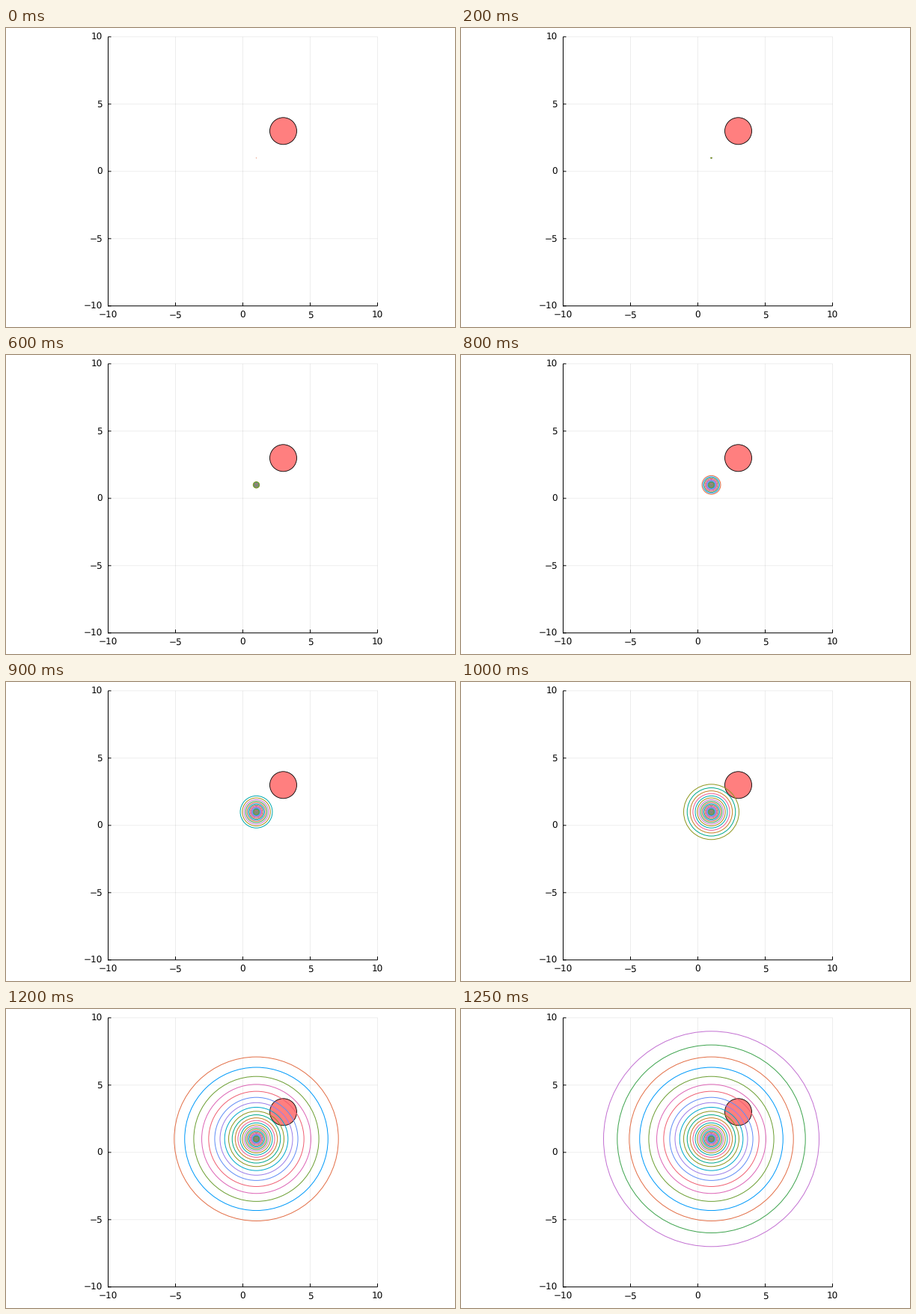
A matplotlib script for the animation above (1.3 s loop, 600 by 400 pixels).

```python
import matplotlib.pyplot as plt
import numpy as np
from matplotlib.animation import FuncAnimation
from matplotlib.patches import Circle

W, H = 600, 400
FRAMES, INTERVAL = 26, 50
UNIT = 18                      # pixels per data unit
LEFT, BOTTOM = 136.5, 371.8    # pixel position of (-10, -10)
TICKS = range(-10, 11, 5)
RINGS = 2 * FRAMES - 1
PALETTE = ["#009AFA", "#E36F47", "#3EA44E", "#C371D2",
           "#AC8E18", "#00AAAE", "#ED5E93", "#C68225",
           "#00A98D", "#8E971E", "#00A9CC", "#9B7FE9",
           "#618DF6", "#F06073", "#DD65B6", "#6C9F33"]

plt.rcParams.update({"font.family": "DejaVu Sans", "font.size": 12,
                     "text.hinting": "none", "path.snap": False})


def px(x):
    return LEFT + (x + 10) * UNIT


def py(y):
    return BOTTOM - (y + 10) * UNIT


fig = plt.figure(figsize=(W / 72, H / 72), dpi=72, facecolor="white")
ax = fig.add_axes([0, 0, 1, 1])
ax.set(xlim=(0, W), ylim=(H, 0))
ax.axis("off")


def line(x, y, **style):
    ax.plot(x, y, lw=1, solid_capstyle="butt", **style)


def draw_axes():
    right, top = px(10), py(10)
    grid = dict(color="black", alpha=0.07, zorder=1)
    ink = dict(color="black", zorder=2)
    for t in TICKS:
        x, y = px(t), py(t)
        line([x, x], [top, BOTTOM], **grid)
        line([LEFT, right], [y, y], **grid)
        line([x, x], [BOTTOM, BOTTOM - 4.5], **ink)
        line([LEFT, LEFT + 4], [y, y], **ink)
        label = str(t).replace("-", "\u2212")
        ax.text(x, 387.7, label, ha="center", va="baseline")
        ax.text(129, y + 4.4, label, ha="right", va="baseline")
    line([LEFT, LEFT], [top, BOTTOM + 0.5], **ink)
    line([LEFT - 0.5, right], [BOTTOM, BOTTOM], **ink)


def make_ring(i):
    # radii grow exponentially up to 8 units
    r = 8 * np.exp(-0.136 * (RINGS - 1 - i))
    color = PALETTE[(i + 1) % len(PALETTE)]
    ring = Circle((px(1), py(1)), r * UNIT, fill=False,
                  ec=color, lw=1, zorder=4 + i * 0.01)
    return ax.add_patch(ring)


draw_axes()
ax.add_patch(Circle((px(3), py(3)), UNIT, fc=(1, 0, 0, 0.5),
                    ec="black", lw=0.85, zorder=3))
rings = [make_ring(i) for i in range(RINGS)]


def update(k):
    for i, ring in enumerate(rings):
        ring.set_visible(i <= 2 * k)
    return rings


anim = FuncAnimation(fig, update, frames=FRAMES, interval=INTERVAL,
                     repeat=True, repeat_delay=0)
plt.show()
```
